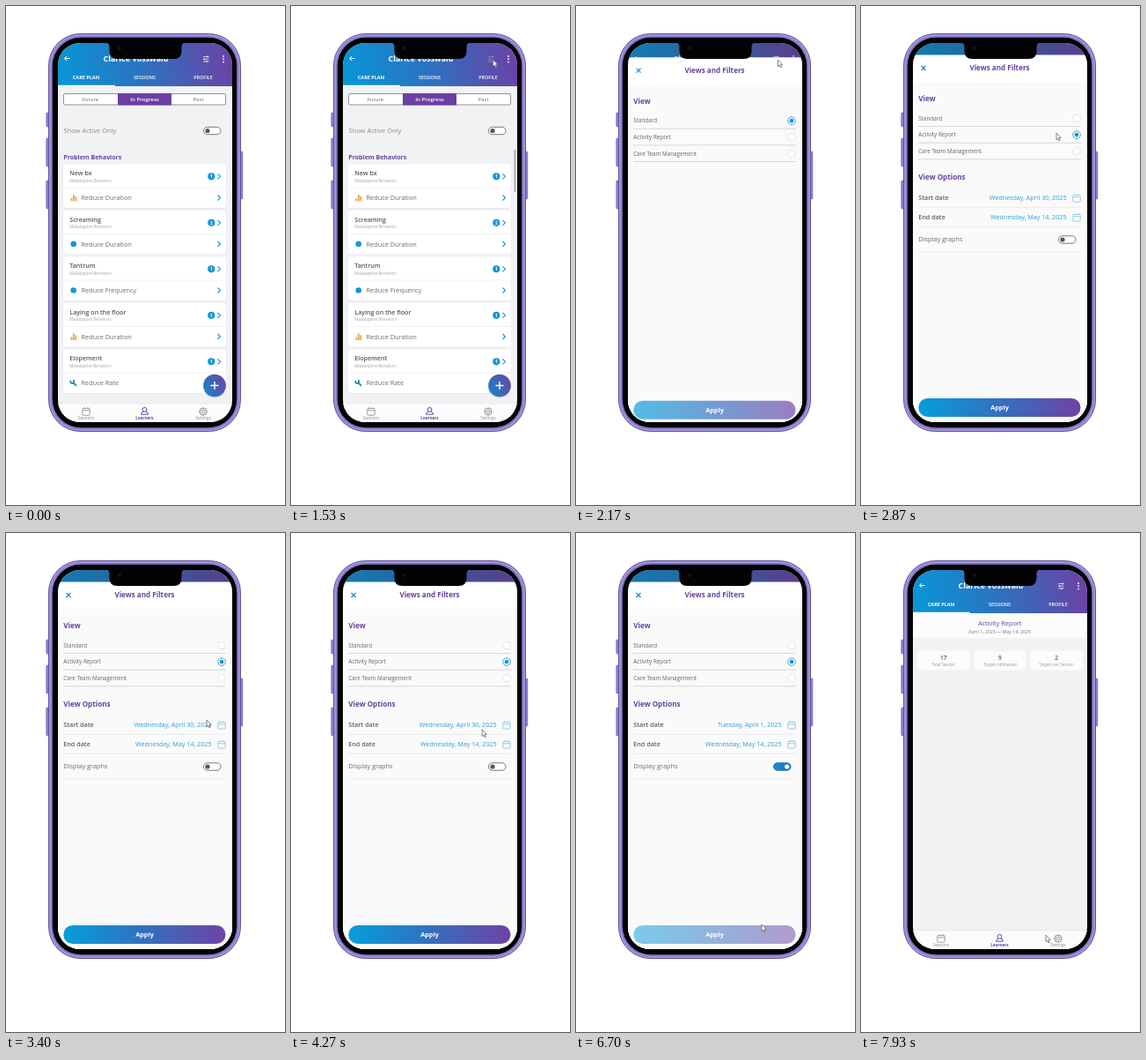
Write an HTML page with a canvas that moves like this. It is 317 by 566 pixels and loops after 8000 ms.

```html
<!DOCTYPE html>
<html lang="en">
<head>
<meta charset="utf-8">
<title>Care plan app</title>
<style>
  html, body { margin: 0; width: 100%; height: 100%; overflow: hidden; background: #fff; }
  canvas { display: block; width: 317px; height: 566px; }
</style>
</head>
<body>
<canvas id="stage"></canvas>
<script>
const W = 317, H = 566, LOOP = 8000;
const canvas = document.getElementById('stage');
const c = canvas.getContext('2d');
const dpr = window.devicePixelRatio || 1;
canvas.width = W * dpr;
canvas.height = H * dpr;

const BLUE = '#1596d6', PURPLE = '#6544a3', GRAY = '#6b6b70', PALE = '#a3a3a8';
const clamp = v => Math.max(0, Math.min(1, v));
const ramp = (t, a, b) => clamp((t - a) / (b - a));
const smooth = p => p * p * (3 - 2 * p);

function box(x, y, w, h, r, fill, stroke, lw = 1) {
  c.beginPath();
  c.roundRect(x, y, w, h, r);
  if (fill) { c.fillStyle = fill; c.fill(); }
  if (stroke) { c.strokeStyle = stroke; c.lineWidth = lw; c.stroke(); }
}
function disc(x, y, r, fill, stroke, lw = 1) {
  box(x - r, y - r, 2 * r, 2 * r, r, fill, stroke, lw);
}
function line(color, lw, ...pts) {
  c.beginPath();
  for (let i = 0; i < pts.length; i += 2) c.lineTo(pts[i], pts[i + 1]);
  c.strokeStyle = color;
  c.lineWidth = lw;
  c.stroke();
}
// y is the middle of the capitals
function text(s, x, y, size, color, weight = 400, align = 'left') {
  c.font = `${weight} ${size}px "Open Sans", "Noto Sans", sans-serif`;
  c.textAlign = align;
  c.fillStyle = color;
  c.fillText(s, x, y + size * 0.36);
}
const mid = (s, x, y, size, color, weight) => text(s, x, y, size, color, weight, 'center');
function gradient(x0, y0, x1, y1, ...colors) {
  const g = c.createLinearGradient(x0, y0, x1, y1);
  colors.forEach((k, i) => g.addColorStop(i / (colors.length - 1), k));
  return g;
}
function faded(alpha, draw) {
  c.save();
  c.globalAlpha *= alpha;
  draw();
  c.restore();
}
const chevron = (x, y) => line(BLUE, 1.1, x, y - 3, x + 3, y, x, y + 3);

function toggle(y, on) {
  box(224.5, y - 4.2, 19.5, 8.4, 4.2,
    on ? gradient(224, 0, 244, 0, '#1d8fd0', '#2a6fb8') : '#fff', on ? '#2474b4' : '#77777c');
  disc(on ? 239.7 : 229, y, 2.6, on ? '#fff' : '#55555a');
}
function calendar(x, y, r, color) {
  box(x - r, y - r + 0.6, 2 * r, 2 * r - 0.6, 1, null, color, 0.8);
  line(color, 0.8, x - r, y - r * 0.3, x + r, y - r * 0.3);
  for (const d of [-r / 2, r / 2]) line(color, 0.8, x + d, y - r - 0.6, x + d, y - r + 1.2);
}

function header(t) {
  c.fillStyle = gradient(59, 85, 250, 42, '#0798d8', '#2d72bf', '#6a43a5');
  c.fillRect(58, 41, 200, 50);
  line('#fff', 1, 72.5, 59.5, 66.5, 59.5);
  line('#fff', 1, 69, 57, 66.5, 59.5, 69, 62);
  mid('Clarice Vosswald', 147.5, 59.5, 8.9, '#fff', 700);
  faded(t > 1480 && t < 1900 ? 0.3 : 1, () => {
    [[57.5, 229], [60.2, 225.5], [62.9, 228]].forEach(([y, x]) => {
      line('#fff', 0.7, 224, y, 230.5, y);
      line('#fff', 1, x, y - 1, x, y + 1);
    });
  });
  for (const y of [57, 60.2, 63.4]) disc(247, y, 0.9, '#fff');
  mid('CARE PLAN', 91, 81, 5.5, '#fff', 700);
  mid('SESSIONS', 157.5, 81, 5.4, '#fff', 600);
  mid('PROFILE', 224, 81, 5.4, '#fff', 600);
  c.fillStyle = '#fff';
  c.fillRect(58, 89.8, 66, 1.4);
}

function tabBar() {
  c.fillStyle = '#fcfcfd';
  c.fillRect(58, 451, 200, 22);
  line('#e2e2e6', 0.6, 58, 451, 258, 451);
  calendar(91, 460, 4.2, '#8a8a90');
  disc(157.5, 457.8, 2.4, null, PURPLE, 1);
  c.beginPath();
  c.moveTo(156.2, 460);
  c.quadraticCurveTo(153.2, 461, 153.6, 463.2);
  c.lineTo(161.4, 463.2);
  c.quadraticCurveTo(161.8, 461, 158.8, 460);
  c.stroke();
  disc(224, 460, 3.8, null, '#8a8a90', 1);
  disc(224, 460, 1.7, null, '#8a8a90', 0.8);
  for (let i = 0; i < 8; i++) {
    const a = i * Math.PI / 4, x = Math.cos(a), y = Math.sin(a);
    line('#8a8a90', 1, 224 + 3.8 * x, 460 + 3.8 * y, 224 + 4.8 * x, 460 + 4.8 * y);
  }
  mid('Sessions', 91, 467.2, 4.7, '#85858a');
  mid('Learners', 157.5, 467.2, 4.6, PURPLE, 700);
  mid('Settings', 224, 467.8, 4.7, '#85858a');
}

function goalIcon(kind, y) {
  if (kind === 'dot') disc(76.7, y, 3.3, BLUE);
  if (kind === 'bars') {
    c.fillStyle = '#e7ad55';
    [2.6, 6.6, 4.6].forEach((h, i) => c.fillRect(73.4 + i * 2.5, y + 3 - h, 1.9, h));
    c.fillRect(73.2, y + 3, 7.4, 0.8);
  }
  if (kind === 'wrench') {
    line('#168aa8', 1.8, 76, y - 0.6, 80, y + 3.4);
    c.beginPath();
    c.arc(75.3, y - 1.4, 1.9, -1.1, 3.8);
    c.stroke();
  }
}

const behaviors = [
  ['New bx', 1, 'bars', 'Reduce Duration'],
  ['Screaming', 2, 'dot', 'Reduce Duration'],
  ['Tantrum', 1, 'dot', 'Reduce Frequency'],
  ['Laying on the floor', 1, 'bars', 'Reduce Duration'],
  ['Elopement', 1, 'wrench', 'Reduce Rate']
];

function plan(t) {
  box(65.5, 99.5, 184, 12.5, 1.5, '#fff', '#85858c', 0.9);
  box(127, 99, 61, 13.5, 0, '#6b3fa3');
  mid('Future', 96, 105.8, 6.1, GRAY);
  mid('In Progress', 157.5, 105.8, 6.1, '#fff', 600);
  mid('Past', 218.5, 105.8, 6.1, GRAY);
  text('Show Active Only', 65.5, 141.3, 7.5, '#8b8b90');
  toggle(141.5, false);
  text('Problem Behaviors', 65.3, 171, 7, PURPLE, 700);
  behaviors.forEach(([name, count, kind, goal], i) => {
    const y = 179.5 + i * 52.5;
    box(64.7, y + 0.6, 185.6, 49.6, 3, '#e6e6ea');
    box(65, y, 185, 49.4, 3, '#fff');
    text(name, 72.3, y + 10, 7.1, '#58585d', 600);
    text('Maladaptive Behaviors', 72.3, y + 18.4, 4.5, PALE);
    disc(233.3, y + 13.8, 4.1, BLUE);
    mid(count, 233.3, y + 13.8, 4.8, '#fff', 700);
    chevron(240.5, y + 13.8);
    line('#ececef', 0.7, 65, y + 26.5, 250, y + 26.5);
    goalIcon(kind, y + 38);
    text(goal, 85.5, y + 38, 7.35, GRAY);
    chevron(240.5, y + 38);
  });
  disc(237, 431.5, 13, '#d2d2dc');
  disc(237, 430.5, 12.8, gradient(225, 438, 249, 424, '#1782ca', '#3f66b5', '#6847a8'));
  line('#fff', 1.4, 232.5, 430.5, 241.5, 430.5);
  line('#fff', 1.4, 237, 426, 237, 435);
  faded(ramp(t, 1300, 1420) * (1 - ramp(t, 1800, 2000)),
    () => box(253.6, 163, 1.8, 48, 0.9, '#a2a2a8'));
}

function report(t) {
  const show = ramp(t, 7230, 7450);
  c.fillStyle = '#fcfcfd';
  c.fillRect(58, 91, 200, 28);
  faded(show, () => {
    mid('Activity Report', 157.7, 102, 7.35, '#5c4b9c');
    mid('April 1, 2025 — May 14, 2025', 157.7, 112, 5.25, '#77777d');
  });
  [['17', 'Total Session'], ['9', 'Targets Addressed'], ['2', 'Targets per Session']]
    .forEach(([value, label], i) => {
      const x = 64 + i * 64.2;
      box(x, 133.7, 59.5, 21.5, 2.5, '#fcfcfd');
      faded(show, () => {
        mid(value, x + 29.7, 141.5, 6.6, '#55555b', 600);
        mid(label, x + 29.7, 149, 4.4, '#97979c');
      });
    });
}

function sheet(t, dy) {
  const picked = t >= 2700, options = ramp(t, 2700, 2850);
  c.save();
  c.translate(0, dy);
  box(58, 55.5, 200, 425, [5, 5, 0, 0], '#fff');
  c.fillStyle = '#fafafb';
  c.fillRect(58, 86, 200, 395);
  line('#1b8ccc', 1.2, 68.5, 68, 73.5, 73);
  line('#1b8ccc', 1.2, 73.5, 68, 68.5, 73);
  mid('Views and Filters', 157.5, 70.3, 8.1, PURPLE, 700);
  text('View', 65.3, 105.5, 8.1, PURPLE, 700);
  ['Standard', 'Activity Report', 'Care Team Management'].forEach((name, i) => {
    const y = 127.5 + i * 18.6, on = i === (picked ? 1 : 0);
    text(name, 65.3, y, 6.3, '#65656a');
    disc(245, y, 4.3, '#fff', on ? '#3ba4da' : '#dcdce0', on ? 1 : 0.8);
    if (on) disc(245, y, 2.4, BLUE);
    line('#cfcfd3', 0.8, 65, y + 9.1, 250, y + 9.1);
  });
  faded(options, () => {
    text('View Options', 65.3, 194.5, 8.1, PURPLE, 700);
    const start = t < 4700 ? 'Wednesday, April 30, 2025' : 'Tuesday, April 1, 2025';
    [['Start date', start], ['End date', 'Wednesday, May 14, 2025']].forEach(([name, date], i) => {
      const y = 217.3 + i * 22;
      text(name, 65.3, y - 0.3, 7.2, '#5f5f64', 600);
      text(date, 233.5, y + 0.5, 7.2, '#2c9fd4', 400, 'right');
      calendar(245, y + 0.7, 4.2, '#84c3e2');
      line('#e4e4e7', 0.7, 65, y + 11, 250, y + 11);
    });
    text('Display graphs', 65.3, 264.3, 7.35, GRAY);
    toggle(265, t >= 6050);
    line('#e4e4e7', 0.7, 65, 279, 250, 279);
  });
  const strength = t >= 6660 ? 0.52 : 0.68 + 0.32 * options;
  faded(strength, () =>
    box(65.3, 445, 184.2, 21, 10.5, gradient(65, 0, 250, 0, '#059fdb', '#3370be', '#7042a5')));
  mid('Apply', 157.5, 455.3, 7.3, '#fff', 700);
  c.restore();
}

// time, x, y of the pointer tip
const path = [
  [700, 150, 420], [1400, 230, 61], [1600, 229.5, 61], [2370, 229.5, 61],
  [2640, 222, 144], [3070, 222, 144], [3350, 228, 212], [3950, 228, 212],
  [5150, 166.5, 274], [5570, 166.5, 274], [5950, 233, 263], [6400, 233, 263],
  [6640, 211, 444], [7250, 211, 444], [7800, 210, 456], [LOOP, 210, 456]
];
function pointer(t) {
  const i = path.findIndex(k => t < k[0]);
  if (i < 1) return;
  const [a, b] = [path[i - 1], path[i]];
  const p = smooth(ramp(t, a[0], b[0]));
  c.save();
  c.translate(a[1] + (b[1] - a[1]) * p, a[2] + (b[2] - a[2]) * p);
  c.beginPath();
  [[0, 0], [0, 7.6], [1.7, 6.1], [2.9, 8.8], [4.1, 8.3], [2.9, 5.7], [5.2, 5.5]]
    .forEach(q => c.lineTo(...q));
  c.closePath();
  c.fillStyle = '#fff';
  c.fill();
  c.strokeStyle = '#66666c';
  c.lineWidth = 0.8;
  c.stroke();
  c.restore();
}

function phone() {
  const edge = '#5d529c';
  for (const [x, y, h] of [[45.8, 121, 16], [45.8, 150, 32], [45.8, 198, 32], [265.2, 165, 54]])
    box(x, y, 3.6, h, 1.2, '#8f82cd', edge, 0.6);
  box(48.5, 31.5, 218, 451, 36, '#a093dc', edge, 1);
  box(51, 34, 213, 446, 33.5, '#8779c6');
  box(52.8, 35.8, 209.4, 442.4, 32, '#030305');
}

function notch() {
  c.beginPath();
  c.moveTo(113, 41);
  c.quadraticCurveTo(117.5, 42, 117.5, 46);
  c.lineTo(117.5, 51);
  c.quadraticCurveTo(117.5, 60, 126.5, 60);
  c.lineTo(190.5, 60);
  c.quadraticCurveTo(199.5, 60, 199.5, 51);
  c.lineTo(199.5, 46);
  c.quadraticCurveTo(199.5, 42, 204, 41);
  c.fillStyle = '#030305';
  c.fill();
  disc(129, 48, 2, '#16161c');
}

function draw(t) {
  c.setTransform(dpr, 0, 0, dpr, 0, 0);
  c.fillStyle = '#fff';
  c.fillRect(0, 0, W, H);
  phone();
  c.save();
  c.beginPath();
  c.roundRect(59, 42, 198, 430, 25);
  c.clip();
  c.fillStyle = '#f1f2f4';
  c.fillRect(58, 41, 200, 432);
  header(t);
  (t < 6800 ? plan : report)(t);
  tabBar();
  const open = 1 - (1 - ramp(t, 1650, 2290)) ** 3;
  const close = ramp(t, 6840, 7200) ** 2;
  const shown = open * (1 - close);
  if (shown > 0) {
    c.fillStyle = `rgba(40,50,60,${0.25 * shown})`;
    c.fillRect(58, 41, 200, 432);
    sheet(t, 417 * (1 - shown));
  }
  c.restore();
  notch();
  pointer(t);
}

const began = performance.now();
function tick() {
  draw((performance.now() - began) % LOOP);
  requestAnimationFrame(tick);
}
tick();
</script>
</body>
</html>
```
